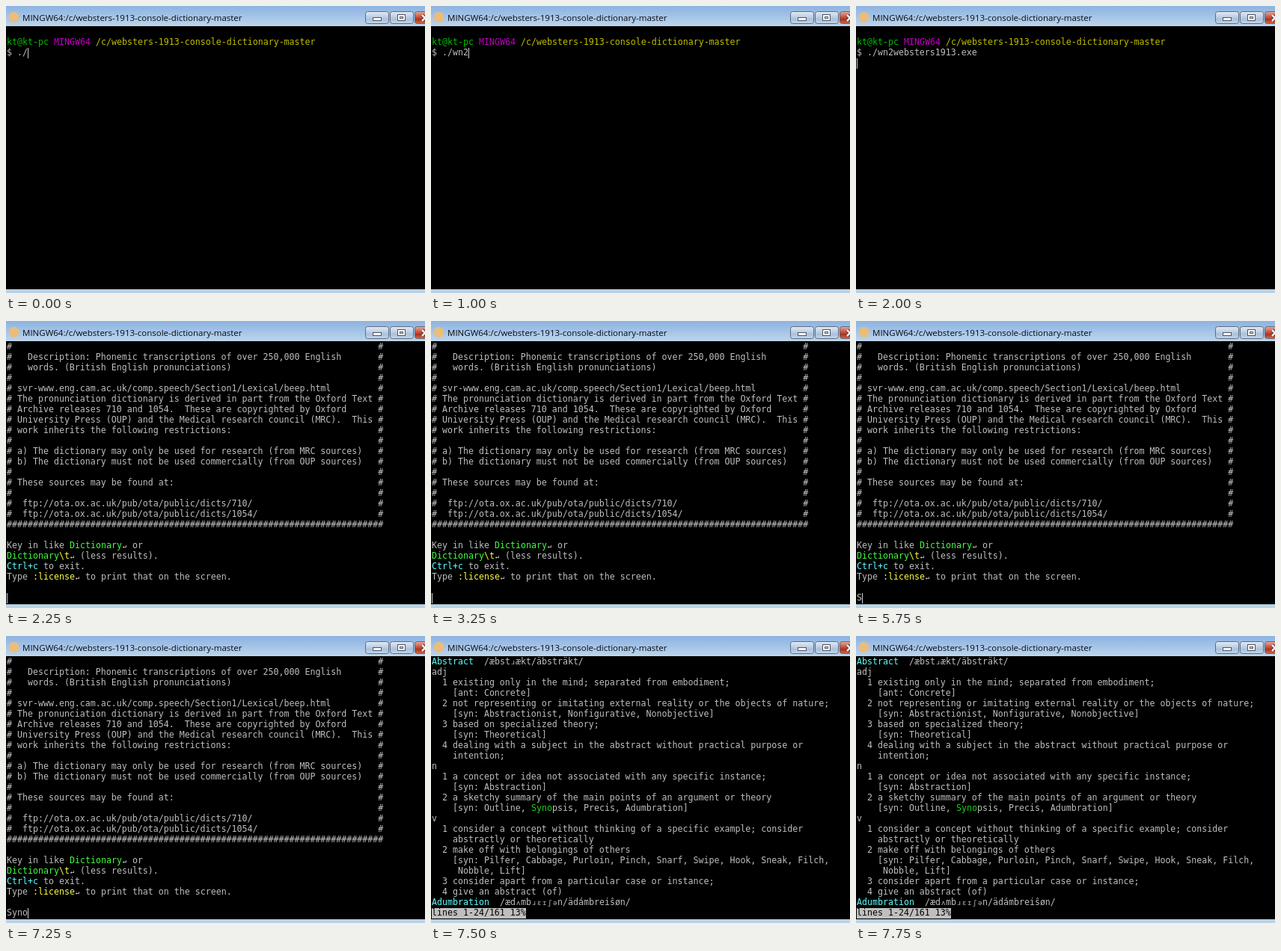
An HTML page with a canvas that plays this animation: 560x384 px, repeating every 8 s.

```html
<!DOCTYPE html>
<html lang="en">
<head>
<meta charset="utf-8">
<title>Console dictionary</title>
<style>
  html, body { margin: 0; width: 100%; height: 100%; overflow: hidden; background: #000; }
  canvas { display: block; width: 560px; height: 384px; }
</style>
</head>
<body>
<canvas id="stage" width="560" height="384"></canvas>
<script>
const ctx = document.getElementById('stage').getContext('2d');
const LOOP = 8000, CELL = 7, LINE = 14, LEFT = 1, TOP = 28;
const MONO = '11.627px "DejaVu Sans Mono", monospace';
const SMALL = '9px "DejaVu Sans Mono", monospace';
const PATH = '/c/websters-1913-console-dictionary-master';

// Markup: {key:text} picks a colour; s and i are drawn in the small font.
const COLORS = {
  d: '#bfbfbf', u: '#00bf00', m: '#bf00bf', p: '#bfbf00', g: '#40ff40',
  y: '#ffff40', c: '#60ffff', h: '#20d020', s: '#e4e4e4', i: '#bfbfbf'
};

const framed = text => ('# ' + text).trimEnd().padEnd(71) + '#';

const welcome = [
  ...[
    '',
    '  Description: Phonemic transcriptions of over 250,000 English',
    '  words. (British English pronunciations)',
    '',
    'svr-www.eng.cam.ac.uk/comp.speech/Section1/Lexical/beep.html',
    'The pronunciation dictionary is derived in part from the Oxford Text',
    'Archive releases 710 and 1054.  These are copyrighted by Oxford',
    'University Press (OUP) and the Medical research council (MRC).  This',
    'work inherits the following restrictions:',
    '',
    'a) The dictionary may only be used for research (from MRC sources)',
    'b) The dictionary must not be used commercially (from OUP sources)',
    '',
    'These sources may be found at:',
    '',
    ' ftp://ota.ox.ac.uk/pub/ota/public/dicts/710/',
    ' ftp://ota.ox.ac.uk/pub/ota/public/dicts/1054/'
  ].map(framed),
  '#'.repeat(72),
  '',
  'Key in like {g:Dictionary}{s:↵} or',
  '{g:Dictionary}{y:\\t}{s:↵} (less results).',
  '{c:Ctrl+c} to exit.',
  'Type {y::license}{s:↵} to print that on the screen.'
];

const results = [
  '{c:Abstract}  /æbst{i:ɹ}ækt/äbsträkt/',
  'adj',
  '  1 existing only in the mind; separated from embodiment;',
  '    [ant: Concrete]',
  '  2 not representing or imitating external reality or the objects of nature;',
  '    [syn: Abstractionist, Nonfigurative, Nonobjective]',
  '  3 based on specialized theory;',
  '    [syn: Theoretical]',
  '  4 dealing with a subject in the abstract without practical purpose or',
  '    intention;',
  'n',
  '  1 a concept or idea not associated with any specific instance;',
  '    [syn: Abstraction]',
  '  2 a sketchy summary of the main points of an argument or theory',
  '    [syn: Outline, {h:Syno}psis, Precis, Adumbration]',
  'v',
  '  1 consider a concept without thinking of a specific example; consider',
  '    abstractly or theoretically',
  '  2 make off with belongings of others',
  '    [syn: Pilfer, Cabbage, Purloin, Pinch, Snarf, Swipe, Hook, Sneak, Filch,',
  '     Nobble, Lift]',
  '  3 consider apart from a particular case or instance;',
  '  4 give an abstract (of)',
  '{c:Adumbration}  /æd{i:ʌ}mb{i:ɹ}{i:ɛ}{i:ɪ}{i:ʃ}{i:ə}n/ädámbreiŝøn/'
];

// [time, text on the line] pairs
const command = [[0, './'], [250, './w'], [500, './wn'], [750, './wn2'],
  [1250, './wn2websters1913.exe']];
const query = [[0, ''], [5500, 'S'], [6000, 'Sy'], [6250, 'Syn'], [6750, 'Syno']];
const ENTER = 2000, WELCOME = 2250, RESULTS = 7500;

const typed = (steps, t) => steps.filter(s => s[0] <= t).pop()[1];

function drawRow(row, text) {
  let col = 0;
  const y = TOP + row * LINE + 10;
  for (const [, key, marked, plain] of text.matchAll(/\{(\w):([^}]+)\}|([^{]+)/g)) {
    const part = marked || plain;
    const small = key === 's' || key === 'i';
    ctx.font = small ? SMALL : MONO;
    ctx.fillStyle = COLORS[key || 'd'];
    ctx.fillText(part, LEFT + col * CELL + (small ? 1 : 0), y);
    col += part.length;
  }
}

const drawRows = rows => rows.forEach((text, i) => drawRow(i, text));

function drawCursor(row, col) {
  ctx.fillStyle = '#cfcfcf';
  ctx.fillRect(LEFT + col * CELL, TOP + row * LINE, 1, LINE);
}

function vertical(y0, y1, ...colors) {
  const g = ctx.createLinearGradient(0, y0, 0, y1);
  colors.forEach((c, i) => g.addColorStop(i / (colors.length - 1), c));
  return g;
}

function drawButton(x, w, ...colors) {
  ctx.beginPath();
  ctx.roundRect(x + .5, 7.5, w, 16, 3);
  ctx.fillStyle = vertical(8, 23, ...colors);
  ctx.fill();
  ctx.strokeStyle = '#5f6b7c';
  ctx.stroke();
}

function drawGlyph(x, y, w, h) {
  ctx.fillStyle = '#fbfbfb';
  ctx.fillRect(x, y, w, h);
  ctx.strokeStyle = '#4f5563';
  ctx.strokeRect(x + .5, y + .5, w - 1, h - 1);
}

function drawWindow() {
  ctx.fillStyle = '#000';
  ctx.fillRect(0, 0, 560, 384);
  ctx.fillStyle = vertical(0, 27, '#8db3e0', '#a3c3e8', '#bdd5ea');
  ctx.fillRect(0, 0, 560, 27);
  ctx.fillStyle = '#b9d3e4';
  ctx.fillRect(0, 379, 560, 5);

  ctx.fillStyle = '#e9bd7c';
  ctx.beginPath();
  ctx.arc(10.5, 15, 7, 0, Math.PI * 2);
  ctx.fill();

  ctx.font = '11.5px "Open Sans", sans-serif';
  ctx.fillStyle = '#0a0c12';
  ctx.fillText('MINGW64:' + PATH, 22, 20);

  ctx.lineWidth = 1;
  const glass = ['#dfe8f2', '#c6d6e8', '#a9c0dc', '#c4d8ec'];
  drawButton(480, 31, ...glass);
  drawButton(513, 31, ...glass);
  drawButton(546, 40, '#e0a597', '#cf6a55', '#b0301c', '#cc6845');
  drawGlyph(490, 15, 12, 5);
  drawGlyph(523, 11, 11, 9);
  ctx.strokeRect(526.5, 14.5, 4, 2);

  for (const [color, width] of [['#5c3030', 4.5], ['#fbf5f2', 2.5]]) {
    ctx.strokeStyle = color;
    ctx.lineWidth = width;
    ctx.beginPath();
    ctx.moveTo(556, 12);
    ctx.lineTo(564, 20);
    ctx.moveTo(564, 12);
    ctx.lineTo(556, 20);
    ctx.stroke();
  }
}

function drawShell(t) {
  const line = typed(command, t);
  drawRow(1, '{u:kt@kt-pc} {m:MINGW64} {p:' + PATH + '}');
  drawRow(2, '$ ' + line);
  if (t < ENTER) drawCursor(2, line.length + 2);
  else drawCursor(3, 0);
}

function drawPrompt(t) {
  const line = typed(query, t);
  drawRows(welcome);
  drawRow(24, line);
  const lit = Math.floor((t - WELCOME) / 500) % 2 === 0;
  if (line || lit) drawCursor(24, line.length);
}

function drawPager() {
  const status = 'lines 1-24/161 13%';
  drawRows(results);
  ctx.fillStyle = COLORS.d;
  ctx.fillRect(LEFT, TOP + 24 * LINE, status.length * CELL, LINE);
  ctx.font = MONO;
  ctx.fillStyle = '#000';
  ctx.fillText(status, LEFT, TOP + 24 * LINE + 10);
}

function frame(now) {
  const t = Math.floor((now % LOOP) / 250) * 250;
  drawWindow();
  if (t < WELCOME) drawShell(t);
  else if (t < RESULTS) drawPrompt(t);
  else drawPager();
  requestAnimationFrame(frame);
}
frame(performance.now());
</script>
</body>
</html>
```
